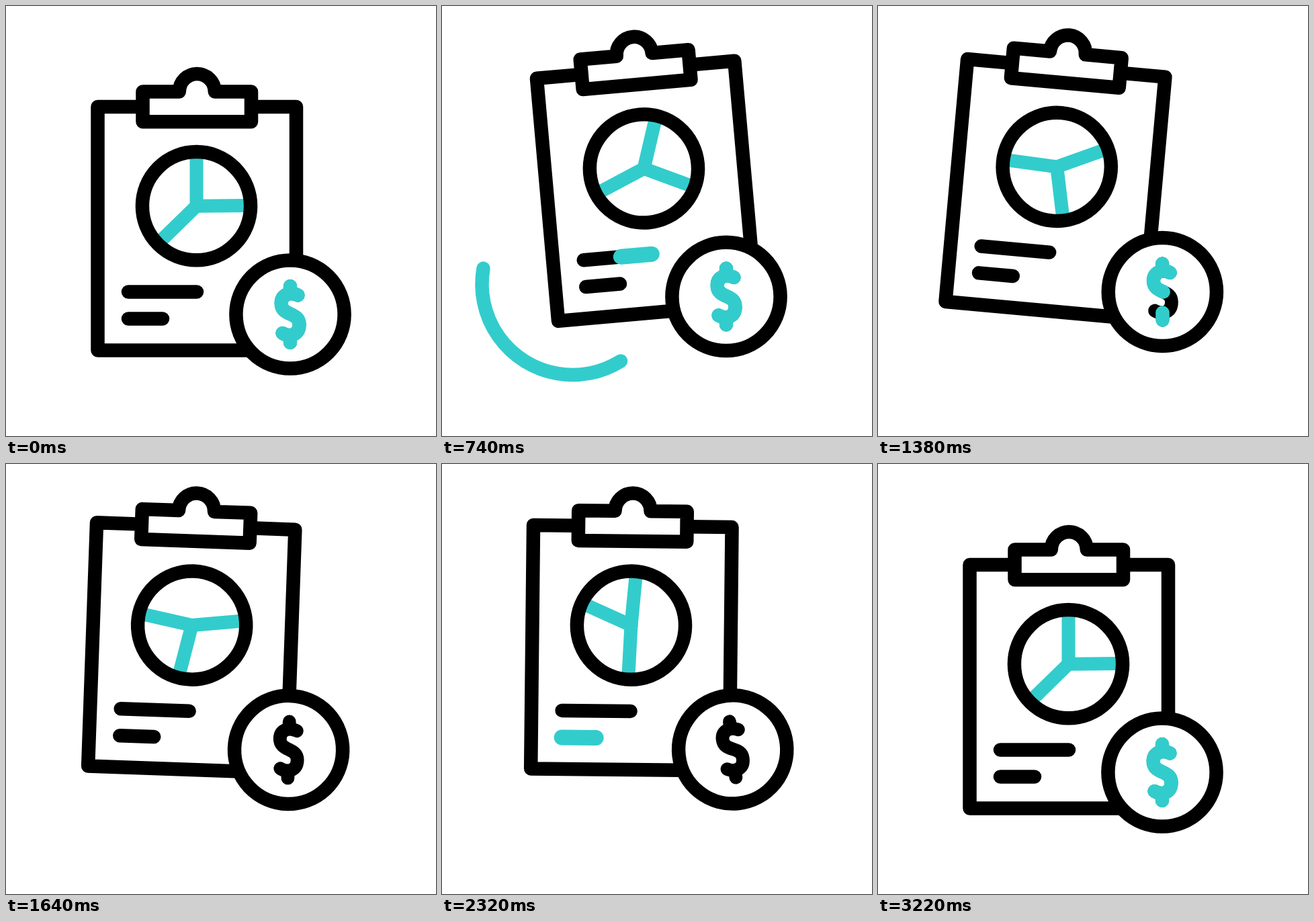
An HTML page with a canvas that plays this animation: 640 px wide and 640 px high, repeating every 3600 ms.

```html
<!DOCTYPE html>
<html lang="en">
<head>
<meta charset="utf-8">
<title>Clipboard report</title>
<style>
  html, body { margin: 0; width: 100%; height: 100%; overflow: hidden; background: #fff; }
  canvas { display: block; width: 640px; height: 640px; }
</style>
</head>
<body>
<canvas id="stage" width="640" height="640"></canvas>
<script>
const ctx = document.getElementById('stage').getContext('2d');
const LOOP = 3600, INK = '#000', TEAL = '#33cccc', WIDTH = 20.5;
const RAD = Math.PI / 180;

const clamp = (v, low = 0, high = 1) => Math.max(low, Math.min(high, v));
const smooth = p => p * p * (3 - 2 * p);
const ramp = (t, from, to) => smooth(clamp((t - from) / (to - from)));

// The board rises, rocks three half swings and settles.
const boardUp = t => ramp(t, 240, 812) - ramp(t, 2527, 3099);
const boardTilt = t =>
  -5.3 * boardUp(t) * Math.cos(Math.PI * clamp((t - 837) / 585, 0, 3));

// The coin hops up, sways three full swings and drops.
const coinUp = t => ramp(t, 430, 870) - ramp(t, 2400, 2860);
const coinTilt = t => 7 * Math.sin(2 * Math.PI * clamp((t - 829) / 555, 0, 3));

// Each spoke turns away from its resting angle and back again.
const turnTimes = [240, 1120, 1640, 2320, 2760, 3100];
const spokes = [
  { rest: -90, turns: [0, 36, 83, 5, -13, 0] },
  { rest: -0.5, turns: [0, 49, 103, 93, 64, 0] },
  { rest: 135.7, turns: [0, 37, 55, 68, 55, 0] }
];

// Smooth curve through the values at the given times.
function flow(times, values, t) {
  const last = times.length - 1;
  t = clamp(t, times[0], times[last]);
  const i = clamp(times.findIndex(time => t < time) - 1, 0, last - 1);
  if (t === times[last]) return values[last];
  const slope = k => {
    const a = Math.max(k - 1, 0), b = Math.min(k + 1, last);
    return (values[b] - values[a]) / (times[b] - times[a]);
  };
  const span = times[i + 1] - times[i];
  const p = (t - times[i]) / span, q = 1 - p;
  return values[i] + (values[i + 1] - values[i]) * smooth(p)
    + span * p * q * (slope(i) * q - slope(i + 1) * p);
}

const frame = new Path2D('M204 150H136.5V512.5H432V150H365');
const clip = new Path2D('M203.5 127.5H257.8A26.5 26.5 0 0 1 310.8 127.5H365V172.3H203.5Z');
const dollar = new Path2D(
  'M423 417V428M434.5 430.5C422 424.5 409.7 430 409.7 442.5' +
  'C409.7 462 436.5 455 436.5 474C436.5 488.5 424 494 411.5 487M423 501V490');
const DOLLAR_LENGTH = 115;

function stroke(path, color = INK, width = WIDTH) {
  ctx.strokeStyle = color;
  ctx.lineWidth = width;
  ctx.stroke(path);
}

function outlined(path) {
  ctx.fillStyle = '#fff';
  ctx.fill(path);
  stroke(path);
}

function line(x0, y0, x1, y1, color, width) {
  const path = new Path2D();
  path.moveTo(x0, y0);
  path.lineTo(x1, y1);
  stroke(path, color, width);
}

function circle(x, y, r) {
  const path = new Path2D();
  path.arc(x, y, r, 0, Math.PI * 2);
  return path;
}

function pivoted(x, y, degrees, lift, draw) {
  ctx.save();
  ctx.translate(x, y - lift);
  ctx.rotate(degrees * RAD);
  ctx.translate(-x, -y);
  draw();
  ctx.restore();
}

// Text bar with a teal highlight between two fractions of its length.
function bar(y, length, from, to) {
  const left = 182;
  line(left, y, left + length, y);
  if (to - from > 0.002) line(left + length * from, y, left + length * to, y, TEAL, 23);
}

function swoosh(t) {
  const at = f => (190 - 145.5 * f) * RAD;
  const tail = ramp(t, 740, 1203), head = ramp(t, 400, 820);
  if (head - tail < 0.002) return;
  const path = new Path2D();
  path.arc(194.5, 414, 135, at(tail), at(head), true);
  stroke(path, TEAL);
}

function board(t) {
  outlined(frame);
  outlined(clip);
  const x = 283.5, y = 297.7, r = 76;
  for (const { rest, turns } of spokes) {
    const a = (rest + flow(turnTimes, turns, t)) * RAD;
    line(x, y, x + r * Math.cos(a), y + r * Math.sin(a), TEAL, 20);
  }
  stroke(circle(x, y, 80.6));
  bar(425.5, 102, ramp(t, 560, 900), ramp(t, 240, 620));
  bar(465.5, 51, ramp(t, 2330, 2700), ramp(t, 1960, 2310));
}

function coin(t) {
  outlined(circle(423, 459, 80.6));
  stroke(dollar, INK, 19.8);
  const shown = 1 - ramp(t, 1160, 1600) + ramp(t, 2790, 3200);
  if (shown < 0.002) return;
  ctx.setLineDash(shown > 0.998 ? [] : [DOLLAR_LENGTH * shown, 999]);
  stroke(dollar, TEAL, 20.6);
  ctx.setLineDash([]);
}

function draw() {
  const t = performance.now() % LOOP;
  ctx.fillStyle = '#fff';
  ctx.fillRect(0, 0, 640, 640);
  ctx.lineCap = ctx.lineJoin = 'round';
  swoosh(t);
  pivoted(284, 106, boardTilt(t), 57.5 * boardUp(t), () => board(t));
  pivoted(423, 373, coinTilt(t), 33.5 * coinUp(t), () => coin(t));
  requestAnimationFrame(draw);
}
draw();
</script>
</body>
</html>
```
